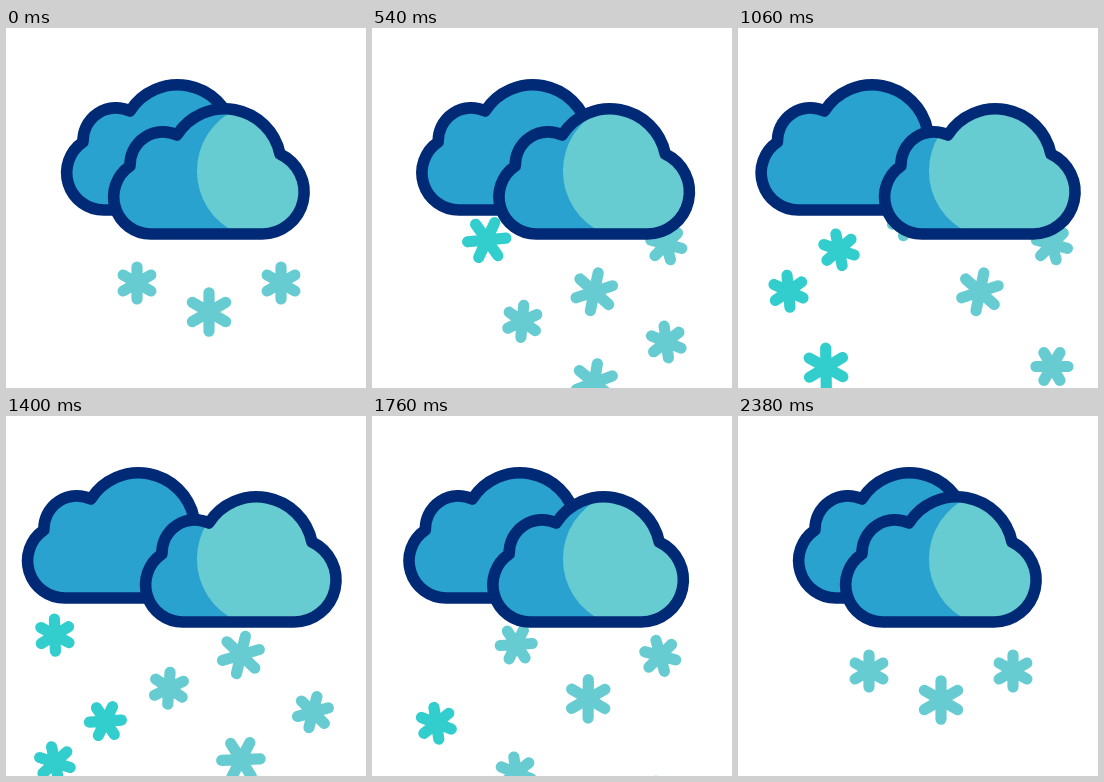
An HTML page for the animation above (2620 ms loop, 360x360 px).

```html
<!DOCTYPE html>
<html lang="en">
<head>
<meta charset="utf-8">
<title>Snow clouds</title>
<style>
html, body { margin: 0; width: 100%; height: 100%; overflow: hidden; background: #fff; }
svg { display: block; width: 100vw; height: 100vh; }
.flake { fill: none; stroke-width: 11.2; stroke-linecap: round; }
.edge { fill: none; stroke: #002a76; stroke-width: 11.6; stroke-linejoin: round; }
</style>
</head>
<body>
<svg viewBox="0 0 360 360">
  <defs>
    <path id="cloud" d="M145 206A37.2 37.2 0 0 1 124 138A33 33 0 0 1 171 107A56.5 56.5 0 0 1 274 126A42 42 0 0 1 256 206Z"/>
    <clipPath id="inside"><use href="#cloud"/></clipPath>
  </defs>
  <g id="backFlakes" stroke="#32cdcd"></g>
  <g id="back">
    <use href="#cloud" fill="#29a2cf"/>
    <use href="#cloud" class="edge"/>
  </g>
  <g id="frontFlakes" stroke="#67ccd1"></g>
  <g id="front">
    <use href="#cloud" fill="#29a2cf"/>
    <g clip-path="url(#inside)">
      <path id="shine" fill="#67ccd1" d="M231 81A68 68 0 0 0 231 205H400V60H231Z"/>
    </g>
    <use href="#cloud" class="edge"/>
  </g>
</svg>
<script>
const LOOP = 2620;
const GAP = 520;      // time between flakes of one column
const EASE = 480;     // time to reach full speed or to brake
const MIDDLE = 260;   // height at which passing flakes are timed
const SPEED = { front: 0.235, back: 0.245 };
const SMALL = 16, LARGE = 19.2;

const byId = id => document.getElementById(id);
const move = (el, x, y, turn = 0) =>
  el.setAttribute('transform', `translate(${x.toFixed(2)} ${y.toFixed(2)}) rotate(${turn.toFixed(2)})`);

// first: when the first of `count` flakes passes the middle.
// leave, land: when the resting flake sets off and a new one settles.
const columns = [
  { layer: 'front', x: 131, arm: SMALL, first: 1349, count: 1, tilt: 6, turn: -0.15, rest: 255, leave: 145, land: 2090, spin: 1 },
  { layer: 'front', x: 203, arm: LARGE, first: 525, count: 2, tilt: 11, turn: 0.2, rest: 284, leave: 0, land: 1830, spin: 0.3 },
  { layer: 'front', x: 275, arm: SMALL, first: 727, count: 2, tilt: 1, turn: 0.37, rest: 255, leave: 50, land: 2010, spin: -1 },
  { layer: 'back', x: 88, arm: SMALL, first: 1048, count: 2, tilt: -5, turn: -0.08 },
  { layer: 'back', x: 125.5, arm: LARGE, first: 737, count: 1, tilt: 15, turn: -0.2 },
  { layer: 'back', x: 138.5, arm: SMALL, first: 1217, count: 1, tilt: 6, turn: 0.45 }
];

// Distance covered after speeding up smoothly from rest
const glide = (t, speed) =>
  t <= 0 ? 0 : t < EASE ? speed * t * t / (2 * EASE) : speed * (t - EASE / 2);

const flakes = [];

// pose(t) gives [height, angle]
function addFlake({ layer, x, arm }, pose) {
  const el = document.createElementNS('http://www.w3.org/2000/svg', 'path');
  const dx = arm * Math.sqrt(3) / 2, dy = arm / 2;
  el.setAttribute('class', 'flake');
  el.setAttribute('d', `M0 ${-arm}V${arm}M${-dx} ${-dy}L${dx} ${dy}M${-dx} ${dy}L${dx} ${-dy}`);
  byId(layer + 'Flakes').append(el);
  flakes.push({ el, layer, x, pose });
}

for (const col of columns) {
  const speed = SPEED[col.layer];
  for (let i = 0; i < col.count; i++) {
    addFlake(col, t => {
      const drop = speed * (t - col.first - i * GAP);
      return [MIDDLE + drop, col.tilt + col.turn * drop];
    });
  }
  if (!col.rest) continue;
  addFlake(col, t => {
    const drop = glide(t - col.leave, speed);
    return [col.rest + drop, 0.13 * Math.sign(col.spin) * drop];
  });
  addFlake(col, t => {
    const left = glide(col.land - t, speed);
    return [col.rest - left, col.spin * left];
  });
}

// Glide from 0 out to 1 at the peak and back again
function swing(t, start, peak, end) {
  const span = t < peak ? peak - start : end - peak;
  const u = Math.min(1, Math.abs(t - peak) / span);
  return (1 + Math.cos(Math.PI * u)) / 2;
}

function draw(t) {
  const drift = {
    front: 39 * swing(t, 0, 1090, 2200),
    back: -40.7 * swing(t, 165, 1258, 2380)
  };
  move(byId('front'), drift.front, 0);
  move(byId('shine'), -drift.front, 0);
  move(byId('back'), drift.back - 47, -24);

  for (const { el, layer, x, pose } of flakes) {
    const [y, angle] = pose(t);
    const shown = y > 168 && y < 390;   // hidden inside the cloud or below the stage
    el.style.display = shown ? '' : 'none';
    if (shown) move(el, x + drift[layer], y, angle);
  }
}

const begin = performance.now();
function tick() {
  draw((performance.now() - begin) % LOOP);
  requestAnimationFrame(tick);
}
tick();
</script>
</body>
</html>
```
